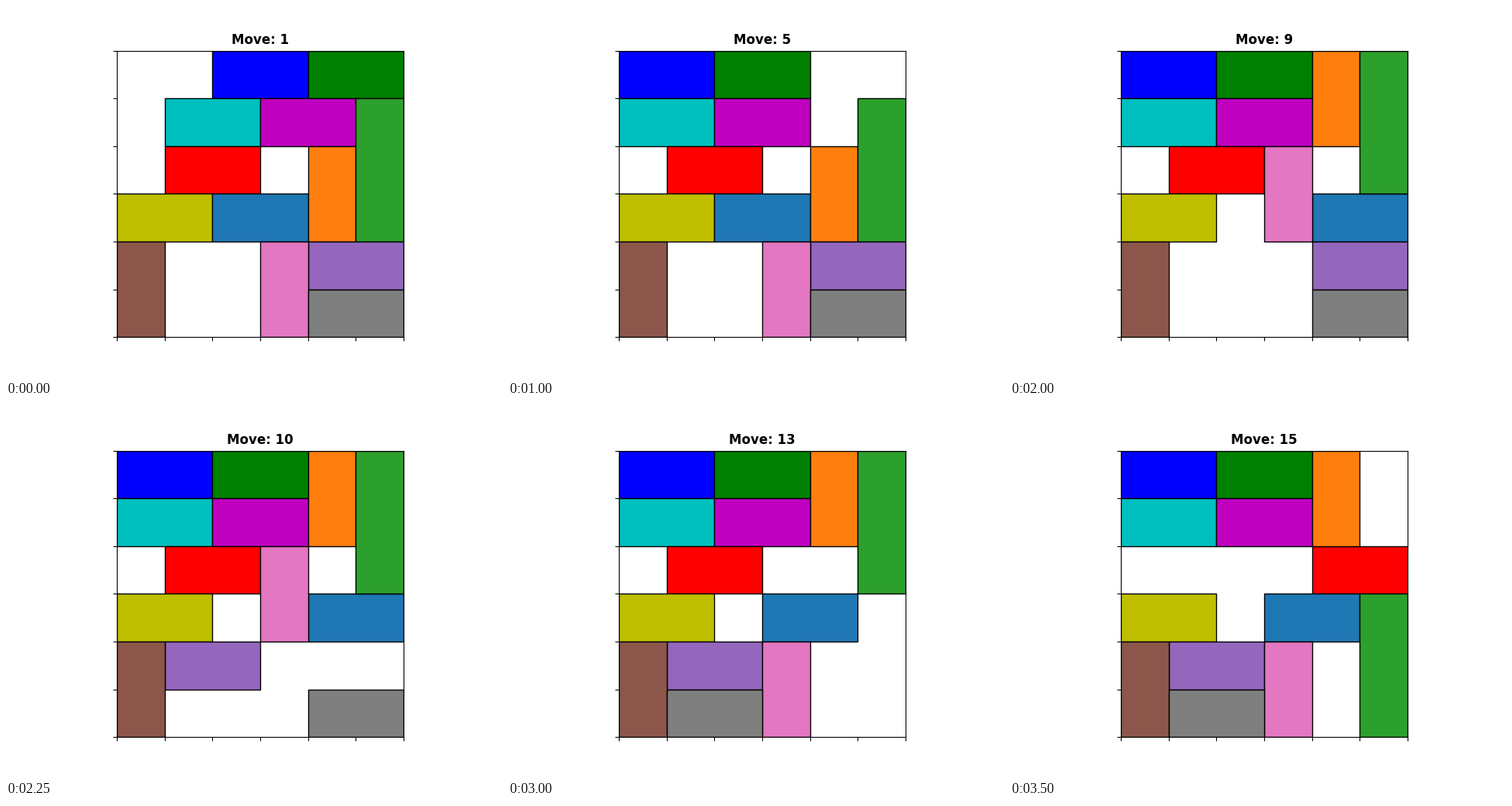
A matplotlib script that plays this animation: 640x480 px, repeating every 3750 ms.

```python
import matplotlib.pyplot as plt
from matplotlib.animation import FuncAnimation
from matplotlib.patches import Rectangle

SIZE = 6

# colour: (column, row, width, height), rows counted from the top
BLOCKS = {
    "b": (2, 0, 2, 1),
    "g": (4, 0, 2, 1),
    "c": (1, 1, 2, 1),
    "m": (3, 1, 2, 1),
    "r": (1, 2, 2, 1),
    "y": (0, 3, 2, 1),
    "tab:blue": (2, 3, 2, 1),
    "tab:orange": (4, 2, 1, 2),
    "tab:green": (5, 1, 1, 3),
    "tab:purple": (4, 4, 2, 1),
    "tab:brown": (0, 4, 1, 2),
    "tab:pink": (3, 4, 1, 2),
    "tab:gray": (4, 5, 2, 1),
}

# (block, columns right, rows down)
MOVES = [
    ("b", -2, 0),
    ("g", -2, 0),
    ("c", -1, 0),
    ("m", -1, 0),
    ("tab:orange", 0, -2),
    ("tab:green", 0, -1),
    ("tab:blue", 2, 0),
    ("tab:pink", 0, -2),
    ("tab:purple", -3, 0),
    ("tab:gray", -3, 0),
    ("tab:pink", 0, 2),
    ("tab:blue", -1, 0),
    ("tab:green", 0, 3),
    ("r", 3, 0),
]

fig, ax = plt.subplots(figsize=(6.4, 4.8), dpi=100)
ax.set_aspect("equal")
ax.set_xlim(0, SIZE)
ax.set_ylim(SIZE, 0)
ax.set_xticks(range(SIZE + 1), labels=[])
ax.set_yticks(range(SIZE + 1), labels=[])
title = ax.set_title("", fontsize=12, fontweight="bold")

patches = {}
for color, (x, y, w, h) in BLOCKS.items():
    patch = Rectangle((x, y), w, h, facecolor=color, edgecolor="black", linewidth=1)
    patches[color] = ax.add_patch(patch)


def draw(step):
    """Show the board after the first `step` slides."""
    spots = {color: box[:2] for color, box in BLOCKS.items()}
    for color, dx, dy in MOVES[:step]:
        x, y = spots[color]
        spots[color] = (x + dx, y + dy)
    for color, spot in spots.items():
        patches[color].set_xy(spot)
    title.set_text(f"Move: {step + 1}")
    return [*patches.values(), title]


anim = FuncAnimation(
    fig,
    draw,
    frames=len(MOVES) + 1,
    init_func=lambda: draw(0),
    interval=250,
    repeat=True,
    repeat_delay=0,
)
plt.show()
```
